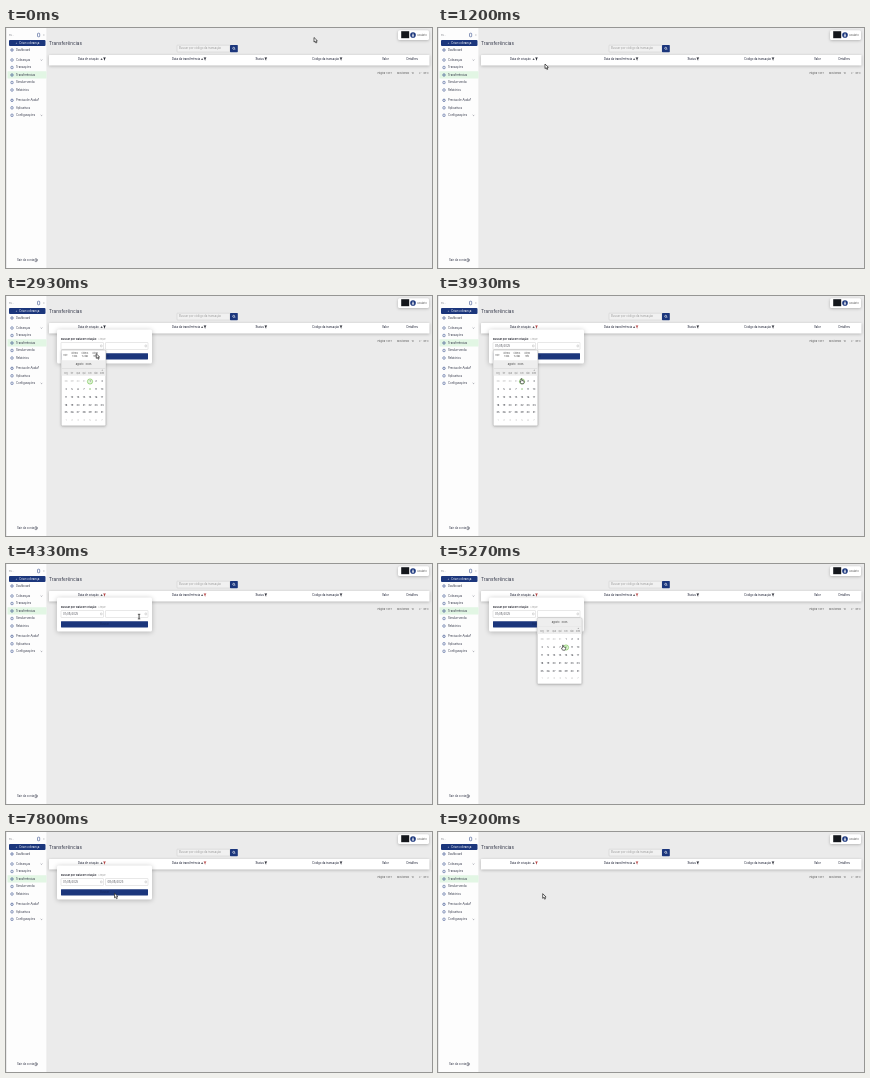
These frames come from a looping animation (426x240 px, 9.47 s). An HTML page with a canvas:

```html
<!DOCTYPE html>
<html lang="pt-BR">
<head>
<meta charset="utf-8">
<title>Transferências</title>
<style>
html, body { margin: 0; width: 100%; height: 100%; overflow: hidden; background: #ebebeb; }
canvas { display: block; width: 426px; height: 240px; }
</style>
</head>
<body>
<canvas id="stage" width="426" height="240"></canvas>
<script>
const ctx = document.getElementById('stage').getContext('2d');
const LOOP = 9470, STEP = 200 / 3;
const NAVY = '#1b367c', INK = '#303446', GREY = '#8b8d94';

// Cursor path: time, x, y
const PATH = [
  [0, 308, 9.5], [200, 308, 9.5], [1200, 107, 36], [1400, 97.5, 30.5],
  [1670, 97.5, 30.5], [2330, 91, 49.5], [2530, 91, 49.5], [2730, 92, 50],
  [3400, 84, 85], [4000, 84, 85], [4400, 137, 50], [4600, 137, 50],
  [5270, 125.5, 83.5], [5730, 125.5, 83.5], [6600, 115.5, 63],
  [7100, 112, 65], [7530, 108.5, 61.2], [8000, 108.5, 61.2],
  [8800, 108.5, 61.2], [9200, 104.7, 61.7], [LOOP, 104.7, 61.7]
];

const between = (t, a, b) => t >= a && t < b;

function cursorAt(t) {
  let i = 1;
  while (i < PATH.length - 1 && PATH[i][0] <= t) i++;
  const [t0, x0, y0] = PATH[i - 1], [t1, x1, y1] = PATH[i];
  const p = Math.min(1, (t - t0) / (t1 - t0));
  const e = p * p * (3 - 2 * p);
  return [x0 + (x1 - x0) * e, y0 + (y1 - y0) * e];
}

function text(str, x, y, size = 3.1, color = INK, align = 'left', weight = 400) {
  ctx.save();
  ctx.translate(x, y);
  ctx.scale(.1, .1);
  ctx.font = `${weight} ${size * 10}px Inter, "Open Sans", sans-serif`;
  ctx.textAlign = align;
  ctx.textBaseline = 'middle';
  ctx.fillStyle = color;
  ctx.fillText(str, 0, 0);
  ctx.restore();
}

function box(x, y, w, h, fill, radius = 0, stroke) {
  ctx.beginPath();
  ctx.roundRect(x, y, w, h, radius);
  if (fill) { ctx.fillStyle = fill; ctx.fill(); }
  if (stroke) { ctx.strokeStyle = stroke; ctx.lineWidth = .5; ctx.stroke(); }
}

function card(x, y, w, h, radius, blur = 3) {
  ctx.save();
  ctx.shadowColor = 'rgba(0,0,0,.25)';
  ctx.shadowBlur = blur;
  ctx.shadowOffsetY = .7;
  box(x, y, w, h, '#fff', radius);
  ctx.restore();
}

function poly(points, fill, stroke, width = .6) {
  ctx.beginPath();
  points.forEach(([x, y]) => ctx.lineTo(x, y));
  if (fill) { ctx.closePath(); ctx.fillStyle = fill; ctx.fill(); }
  if (stroke) { ctx.strokeStyle = stroke; ctx.lineWidth = width; ctx.stroke(); }
}

function dot(x, y, r, fill, stroke) {
  ctx.beginPath();
  ctx.arc(x, y, r, 0, 7);
  if (fill) { ctx.fillStyle = fill; ctx.fill(); }
  if (stroke) { ctx.strokeStyle = stroke; ctx.lineWidth = .6; ctx.stroke(); }
}

function chevron(x, y, s = .8, color = INK) {
  poly([[x - s, y - s / 2], [x, y + s / 2], [x + s, y - s / 2]], null, color, .4);
}

function funnel(x, y, color) {
  poly([[x - 1.4, y - 1.4], [x + 1.4, y - 1.4], [x + .4, y], [x + .4, y + 1.5], [x - .4, y + 1], [x - .4, y]], color);
}

function sidebar() {
  box(1, 0, 40, 240, '#fdfdfd');
  box(40.6, 0, .5, 240, '#dedede');
  text('Eu...', 3, 7, 2.6, GREY);
  box(31.5, 5.2, 2.2, 3.6, null, .7, NAVY);
  poly([[38.3, 6], [37.4, 7], [38.3, 8]], null, GREY, .4);
  box(3, 12, 36.5, 6, NAVY, 1);
  text('+  Criar cobrança', 21.5, 15.1, 2.9, '#fff', 'center');
  box(1.5, 43.3, 39, 7.2, '#e2f6e4');

  const items = [
    ['Dashboard', 22], ['Cobranças', 32, 1], ['Transações', 39.5], ['Transferências', 47],
    ['Simular venda', 54.5], ['Relatórios', 62], ['Precisa de Ajuda?', 72.3],
    ['Aplicativos', 79.8], ['Configurações', 87.3, 1]
  ];
  items.forEach(([label, y, more], i) => {
    text(label, 10, y, 2.75);
    if (i % 3) box(4.9, y - 1.1, 2.2, 2.2, null, .4, NAVY);
    else dot(6, y, 1.2, null, NAVY);
    if (more) chevron(35.5, y);
  });
  text('Sair da conta', 11, 232.2, 2.75);
  box(29, 230.8, 1.8, 2.8, null, .3, INK);
  poly([[30, 232.2], [32, 232.2], [31.4, 231.6]], null, INK, .4);
}

function page(filtered) {
  text('Transferências', 43, 15.3, 4.7);

  box(171, 17.2, 53, 6.8, '#f1f1f1', .6, '#c9c9c9');
  text('Buscar por código da transação', 173, 20.6, 2.8, '#9a9a9a');
  box(224, 17, 7.8, 7.2, NAVY, .6);
  dot(227.7, 20.3, 1, null, '#fff');
  poly([[228.4, 21], [229.2, 21.8]], null, '#fff', .5);

  card(392, 2.3, 31, 9.8, 1.5);
  box(395.2, 3.2, 8, 7, '#14171c');
  dot(407, 7, 2.8, NAVY);
  dot(407, 6.3, .7, '#fff');
  box(405.8, 7.3, 2.4, 1.1, '#fff', .5);
  text('Usuário', 411, 7, 2.7, '#555');

  card(43, 27, 380.5, 10.5, .5);
  const columns = [
    ['Data de criação', 72, 98.5, 1], ['Data da transferência', 166, 199, 1],
    ['Status', 249.5, 259.8], ['Código da transação', 306, 335],
    ['Valor', 376], ['Detalhes', 400.5]
  ];
  columns.forEach(([label, x, icon, date]) => {
    text(label, x, 30.9, 2.75, INK, 'left', 500);
    if (icon) funnel(icon, 31, date && filtered ? '#b54242' : '#20222c');
    if (date) poly([[icon - 4, 31.7], [icon - 2.9, 30.2], [icon - 1.8, 31.7]], '#20222c');
  });

  text('Página 1 de 1', 371.5, 45, 2.4, '#555');
  text('Mostrando', 391, 45, 2.4, '#555');
  text('10', 405.5, 45, 2.4, '#555');
  chevron(414, 45, .9, '#333');
  text('de 0', 417.5, 45, 2.4, '#555');
}

function dateInput(x, value) {
  box(x, 46.5, 42.5, 7, '#fff', .4, '#d0d0d0');
  if (value) text(value, x + 2, 50, 2.8, '#50525a');
  box(x + 39.5, 49, 1.6, 1.8, null, .2, '#b9b9b9');
}

function popup(from, to, hover) {
  card(51, 33.5, 95, 34, 1.5, 5);
  text('Buscar por Data de criação', 55, 43.2, 2.7, '#20222c', 'left', 600);
  text('Limpar', 92.5, 43.2, 2.2, '#999');
  dateInput(55, from);
  dateInput(99.5, to);
  box(55, 57.2, 87, 6.2, hover ? '#32488c' : NAVY, .4);
  text('Buscar', 98.5, 60.3, 2.8, '#172a60', 'center');
}

function calendar(x, y, presets, col, row) {
  const shift = presets ? 9.8 : 0;
  card(x, y, 44.5, 66 + shift, .8);
  box(x, y, 44.5, 66 + shift, '#fff', .8, '#aaa');
  if (presets) {
    [['Hoje'], ['Últimos', '7 dias'], ['Últimos', '15 dias'], ['Último', 'mês']].forEach((lines, i) =>
      lines.forEach((line, j) =>
        text(line, x + 4 + i * 10.3 + (i > 0 ? -1 : 0) * 1, y + (lines[1] ? 3.7 + j * 2.9 : 5), 1.9, '#444', 'center')));
  }
  const top = y + shift;
  box(x + .4, top + .4, 43.7, 15.6, '#eee');
  box(x + .4, top + 8.2, 43.7, .4, '#d5d5d5');
  text('agosto   2025', x + 22.2, top + 4.2, 2.4, '#333', 'center');
  poly([[x + 40.2, top + 10.8], [x + 41, top + 9.8], [x + 41.8, top + 10.8]], '#888');
  const colX = i => x + 4.7 + i * 6;
  const rowY = i => top + 21.7 + i * 7.8;
  ['seg', 'ter', 'qua', 'qui', 'sex', 'sáb', 'dom'].forEach((d, i) =>
    text(d, colX(i), top + 13.5, 2, '#777', 'center'));
  dot(colX(col), rowY(row), 2.6, '#dff5d5', '#6fc04a');
  for (let i = 0; i < 42; i++) {
    const day = i - 3, inside = day >= 1 && day <= 31;
    const label = day < 1 ? day + 31 : day > 31 ? day - 31 : day;
    text(label, colX(i % 7), rowY(Math.floor(i / 7)), 2.6,
      !inside ? '#b8b8b8' : day === 8 ? '#5aa83b' : '#33353d', 'center');
  }
}

function cursor(x, y, kind) {
  ctx.save();
  ctx.translate(x, y);
  ctx.lineJoin = 'round';
  if (kind === 'text') {
    poly([[-1.2, -2.3], [1.2, -2.3]], null, '#222', .7);
    poly([[0, -2.3], [0, 2.3]], null, '#222', .8);
    poly([[-1.2, 2.3], [1.2, 2.3]], null, '#222', .7);
  } else if (kind === 'hand') {
    const hand = [[-1, -2.3], [-.2, -2.3], [0, -.5], [2, 0], [2.1, 1.3], [1.5, 2.7], [-.9, 2.7], [-2.1, .6], [-1, .4], [-1, -2.3]];
    poly(hand, '#fff', '#222', .6);
  } else {
    const arrow = [[0, 0], [0, 4.6], [1.1, 3.7], [1.9, 5.5], [2.8, 5.1], [2, 3.4], [3.4, 3.3], [0, 0]];
    poly(arrow, '#fff', '#222', .7);
  }
  ctx.restore();
}

function cursorKind(t) {
  if (between(t, 2200, 2860) || between(t, 4260, 4650)) return 'text';
  if (between(t, 1320, 1860) || between(t, 3250, 4060) || between(t, 5060, 5860)) return 'hand';
  return 'arrow';
}

function draw(t) {
  ctx.fillStyle = '#ebebeb';
  ctx.fillRect(0, 0, 426, 240);
  sidebar();
  page(t >= 3860);
  if (between(t, 1660, 7930)) {
    popup(t >= 3860 && '01/08/2025', t >= 5720 && '08/08/2025', between(t, 6460, 7590));
  }
  if (between(t, 2790, 3990)) calendar(55.3, 54, true, 4, 0);
  if (between(t, 4460, 5790)) calendar(99.3, 54, false, 4, 1);
  cursor(...cursorAt(t), cursorKind(t));
}

const start = performance.now();
function tick(now) {
  const t = Math.max(0, now - start) % LOOP;
  draw(Math.floor((t + 5) / STEP) * STEP);
  requestAnimationFrame(tick);
}
draw(0);
requestAnimationFrame(tick);
</script>
</body>
</html>
```
